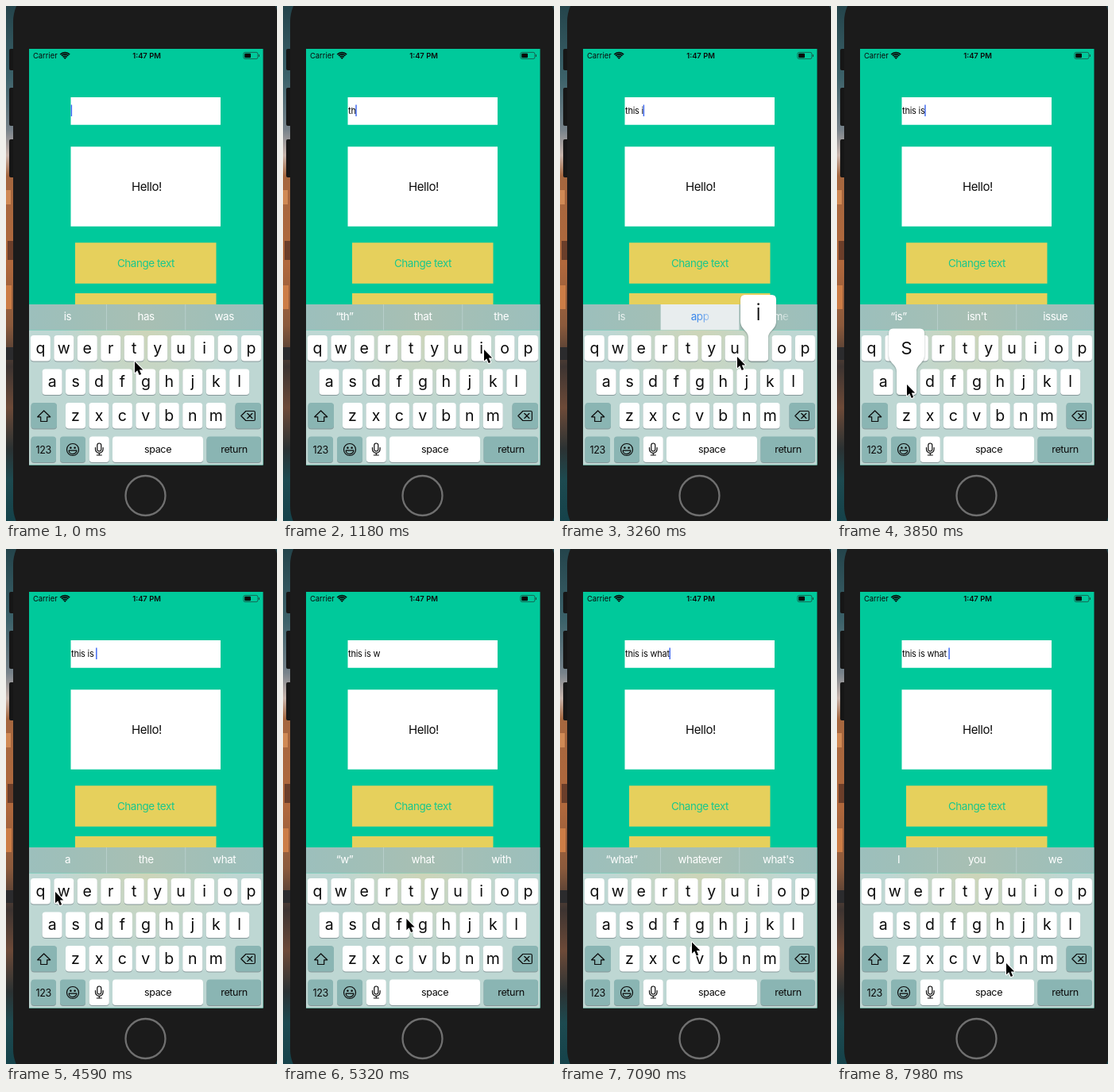
Write an HTML page with a canvas that moves like this. It is 341 px wide and 649 px high and loops after 8 s.

```html
<!DOCTYPE html>
<html lang="en">
<head>
<meta charset="utf-8">
<title>Typing on a phone</title>
<style>
html, body { margin: 0; width: 100%; height: 100%; overflow: hidden; background: #1b1b1b; }
canvas { display: block; width: 341px; height: 649px; }
</style>
</head>
<body>
<canvas id="stage"></canvas>
<script>
const LOOP = 8000, STEP = 147.9;
const canvas = document.getElementById('stage');
const ctx = canvas.getContext('2d');
const scale = window.devicePixelRatio || 1;
canvas.width = 341 * scale;
canvas.height = 649 * scale;

const GREEN = '#00c99b', YELLOW = '#e6d05c', BODY = '#1b1b1b', FUNCTION_KEY = '#8ab5b3', INK = '#0b0b0b';

// Each entry: step, field text, suggestions, whether the middle one is highlighted
const typing = [
  [0, '', 'is has was'],
  [1, 't', '“t” the to'],
  [5, 'th', '“th” that the'],
  [9, 'thi', '“thi” this things', true],
  [13, 'this', "“this” this'll this's"],
  [18, 'this ', 'is app time'],
  [21, 'this i', 'is app time'],
  [22, 'this i', 'is app time', true],
  [23, 'this i', '“i” is in', true],
  [25, 'this is', "“is” isn't issue"],
  [29, 'this is ', 'a the what'],
  [32, 'this is w', '“w” what with'],
  [39, 'this is wh', '“wh” what when'],
  [44, 'this is wha', '“wha” what whatever'],
  [46, 'this is what', "“what” whatever what's"],
  [48, 'this is what ', 'I you we']
];

// Pressed keys: first step, last step, key
const presses = [
  [1, 1, 't'], [5, 5, 'h'], [9, 10, 'i'], [13, 13, 's'], [17, 17, 'space'], [21, 22, 'i'],
  [25, 26, 's'], [28, 28, 'space'], [32, 32, 'w'], [39, 39, 'h'], [46, 46, 't'], [49, 49, 'space']
];

// Pointer stops: step, x, y
const pointerPath = [
  [0, 162, 448], [1, 162, 448], [3, 196, 514], [5, 206, 478], [8, 253, 433], [10, 252, 434],
  [12, 88, 476], [14, 88, 477], [16, 163, 546], [18, 163, 547], [20, 250, 436], [21, 250, 436],
  [22, 223, 442], [24, 92, 476], [26, 88, 477], [27, 150, 545], [29, 155, 550], [31, 62, 432],
  [33, 64, 433], [38, 205, 484], [40, 200, 476], [42, 105, 433], [43, 65, 470], [44, 65, 472],
  [46, 160, 440], [48, 172, 551], [50, 172, 550], [53, 213, 522], [54, 213, 522]
];

const rows = [['qwertyuiop', 43.4, 415], ['asdfghjkl', 58.1, 457.5], ['zxcvbnm', 87.5, 500]];
const keys = rows.flatMap(([letters, x, y]) =>
  [...letters].map((letter, i) => ({ letter, x: x + i * 29.45, y })));

function rect(x, y, w, h, fill, radius = 0) {
  ctx.fillStyle = fill;
  ctx.beginPath();
  ctx.roundRect(x, y, w, h, radius);
  ctx.fill();
}

function text(string, x, y, size, fill, { align = 'center', weight = 400, tracking = -0.03 } = {}) {
  ctx.font = `${weight} ${size}px Inter, sans-serif`;
  ctx.letterSpacing = `${tracking * size}px`;
  ctx.textAlign = align;
  ctx.fillStyle = fill;
  ctx.fillText(string, x, y);
  return ctx.measureText(string).width;
}

function path(d, x, y, { fill, stroke, width = 1.2 } = {}) {
  const shape = new Path2D(d);
  ctx.save();
  ctx.translate(x, y);
  ctx.lineJoin = ctx.lineCap = 'round';
  ctx.lineWidth = width;
  if (stroke) { ctx.strokeStyle = stroke; ctx.stroke(shape); }
  if (fill) { ctx.fillStyle = fill; ctx.fill(shape); }
  ctx.restore();
}

function gradient(x0, y0, x1, y1, stops) {
  const g = ctx.createLinearGradient(x0, y0, x1, y1);
  stops.forEach(([at, color]) => g.addColorStop(at, color));
  return g;
}

function drawWallpaper() {
  rect(0, 0, 341, 649, gradient(0, 0, 0, 649, [
    [0, '#24444b'], [0.14, '#3c626a'], [0.24, '#77828a'], [0.29, '#c9b5ac'], [0.33, '#a5673f'],
    [0.5, '#b0683c'], [0.62, '#8b5a3c'], [0.7, '#3d3431'], [0.78, '#6d4a38'], [0.86, '#2b3233'],
    [0.92, '#1d4a50'], [1, '#15424a']
  ]));
  rect(0, 232, 6, 18, '#d08a55');
  rect(2, 296, 7, 24, '#6b3e2a');
  rect(0, 352, 7, 30, '#cc7d46');
  rect(0, 430, 9, 16, '#2b2b2d');
}

function drawPhone() {
  rect(4, 54, 7, 27, '#161616', 2);
  rect(4, 103, 7, 48, '#161616', 2);
  rect(4, 168, 7, 48, '#161616', 2);
  rect(9, -30, 334, 710, BODY, 50);
  ctx.strokeStyle = '#707070';
  ctx.lineWidth = 2.3;
  ctx.beginPath();
  ctx.arc(175.5, 617, 25, 0, Math.PI * 2);
  ctx.stroke();
}

function drawStatusBar() {
  text('Carrier', 34, 66, 9.4, INK, { align: 'left', tracking: 0 });
  text('1:47 PM', 177, 66, 9.4, INK, { weight: 600, tracking: 0 });
  ctx.strokeStyle = INK;
  ctx.lineWidth = 1.7;
  for (const r of [3.6, 6.1, 8.4]) {
    ctx.beginPath();
    ctx.arc(74.2, 67, r, -Math.PI * 0.75, -Math.PI * 0.25);
    ctx.stroke();
  }
  path('M0 0L-1.7 -1.7A2.4 2.4 0 0 1 1.7 -1.7Z', 74.2, 67, { fill: INK });
  ctx.strokeStyle = '#1c4f43';
  ctx.lineWidth = 0.8;
  ctx.beginPath();
  ctx.roundRect(298.9, 58.4, 18, 8.2, 2);
  ctx.stroke();
  rect(300.2, 59.7, 7.8, 5.6, INK, 1);
  rect(317.8, 61, 1.2, 3, '#1c4f43', 0.6);
}

function drawApp(string, caretOn) {
  rect(29, 54, 294.5, 524.5, GREEN);
  drawStatusBar();
  rect(81.5, 115, 188.5, 34.8, '#fff');
  const width = text(string, 82, 136, 11, INK, { align: 'left', tracking: -0.02 });
  if (caretOn) rect(81.6 + width, 124.5, 1.5, 14.5, '#426bf2');
  rect(81.5, 177.2, 188.5, 100.6, '#fff');
  text('Hello!', 177, 232.5, 15, INK);
  rect(87, 298.2, 177.5, 51.6, YELLOW);
  text('Change text', 176, 329, 13.4, '#18c78d');
  rect(87, 362, 177.5, 16, YELLOW);
}

function drawSuggestions(words, highlighted, fading) {
  rect(29, 376, 294.5, 32.5, gradient(29, 0, 323, 0, [
    [0, '#9cbfbc'], [0.2, '#a0bfb8'], [0.5, '#a8bfb3'], [0.8, '#a0bfb8'], [1, '#9cbfbc']
  ]));
  if (highlighted) rect(127, 376, 98.5, 32.5, '#e8edee');
  rect(126.2, 376, 0.8, 32.5, '#bcd3d0');
  rect(225.4, 376, 0.8, 32.5, '#bcd3d0');
  words.split(' ').forEach((word, i) => {
    const x = 77.5 + i * 98.6;
    const rgb = highlighted && i === 1 ? '40,125,235' : '255,255,255';
    const fill = fading
      ? gradient(x - 11, 0, x + 11, 0, [[0, `rgba(${rgb},1)`], [0.6, `rgba(${rgb},.75)`], [1, `rgba(${rgb},.35)`]])
      : `rgb(${rgb})`;
    text(word, x, 396, 13.4, fill);
  });
}

function drawKeyShape(x, y, w, fill) {
  rect(x, y + 1, w, 32.5, '#87989a', 4);
  rect(x, y, w, 32.5, fill, 4);
}

function drawFunctionKeys(spaceDown) {
  drawKeyShape(31.5, 500, 32.5, FUNCTION_KEY);
  drawKeyShape(288.5, 500, 32.5, FUNCTION_KEY);
  drawKeyShape(31.5, 542.5, 31.5, FUNCTION_KEY);
  drawKeyShape(68, 542.5, 32, FUNCTION_KEY);
  drawKeyShape(104.8, 542.5, 25, '#fff');
  drawKeyShape(134, 542.5, 114, spaceDown ? FUNCTION_KEY : '#fff');
  drawKeyShape(252.5, 542.5, 68.5, FUNCTION_KEY);
  text('123', 47.3, 563.5, 12.6, INK);
  text('space', 191, 563, 12.6, INK);
  text('return', 287, 563, 12.6, INK);
  const line = { stroke: INK };
  path('M0 -7L8 .8H4V6.5H-4V.8H-8Z', 47.7, 517, line);
  path('M-9 0L-3 -6H7Q8.5 -6 8.5 -4.5V4.5Q8.5 6 7 6H-3ZM-1 -3L5 3M5 -3L-1 3', 304.8, 516.5, line);
  path('M7.5 0A7.5 7.5 0 1 1 -7.5 0A7.5 7.5 0 1 1 7.5 0M-4.8 1.2H4.8A4.8 4.4 0 0 1 -4.8 1.2', 84, 559, line);
  path('M-2.6 -3.6A1 1 0 0 1 -2.6 -1A1 1 0 0 1 -2.6 -3.6M2.6 -3.6A1 1 0 0 1 2.6 -1A1 1 0 0 1 2.6 -3.6', 84, 559, { fill: INK });
  path('M-2.5 -5A2.5 2.5 0 0 1 2.5 -5V0A2.5 2.5 0 0 1 -2.5 0ZM-4.8 -2V0A4.8 4.8 0 0 0 4.8 0V-2M0 5V7.5M-3 7.5H3', 117.3, 558.5, line);
}

function drawPopup({ letter, x, y }) {
  ctx.save();
  ctx.shadowColor = 'rgba(40,60,60,.45)';
  ctx.shadowBlur = 2 * scale;
  ctx.shadowOffsetY = scale;
  path('M-17 -51H17Q22.5 -51 22.5 -45V-18C22.5 -7 12.5 -6 12.5 3V28.5Q12.5 32.5 8.5 32.5H-8.5' +
    'Q-12.5 32.5 -12.5 28.5V3C-12.5 -6 -22.5 -7 -22.5 -18V-45Q-22.5 -51 -17 -51Z', x, y, { fill: '#fff' });
  ctx.restore();
  text(letter, x, y - 19, 29, INK, { weight: 350, tracking: 0 });
}

function drawKeyboard(pressed) {
  rect(29, 408.5, 294.5, 170, '#bed7d3');
  const glow = ctx.createRadialGradient(176, 405, 0, 176, 405, 110);
  glow.addColorStop(0, 'rgba(224,210,150,.45)');
  glow.addColorStop(1, 'rgba(224,210,150,0)');
  rect(29, 408.5, 294.5, 170, glow);
  for (const { letter, x, y } of keys) {
    drawKeyShape(x - 12.5, y, 25, '#fff');
    text(letter, x, y + 22.5, 19.5, INK, { tracking: 0 });
  }
  drawFunctionKeys(pressed === 'space');
  const popped = keys.find(key => key.letter === pressed);
  if (popped) drawPopup(popped);
}

function drawPointer(step) {
  const next = Math.max(1, pointerPath.findIndex(stop => stop[0] >= step));
  const [from, x0, y0] = pointerPath[next - 1];
  const [to, x1, y1] = pointerPath[next];
  const p = (step - from) / (to - from);
  const eased = p * p * (3 - 2 * p);
  path('M0 0V14.3L3.3 11.2L5.7 17L8.2 16L5.8 10.4H10.2Z',
    x0 + (x1 - x0) * eased, y0 + (y1 - y0) * eased, { fill: '#000', stroke: '#fff', width: 2 });
}

function draw(time) {
  const step = Math.min(54, Math.floor((time + 8) / STEP));
  const [since, string, words, highlighted] = typing.findLast(entry => entry[0] <= step);
  const pressed = presses.find(([first, last]) => step >= first && step <= last)?.[2];
  const age = step - since;
  ctx.setTransform(scale, 0, 0, scale, 0, 0);
  drawWallpaper();
  drawPhone();
  drawApp(string, age % 6 < 4);
  drawSuggestions(words, highlighted, step === 22);
  drawKeyboard(pressed);
  drawPointer(step);
}

const start = performance.now();
function tick() {
  draw((performance.now() - start) % LOOP);
  requestAnimationFrame(tick);
}
tick();
</script>
</body>
</html>
```
